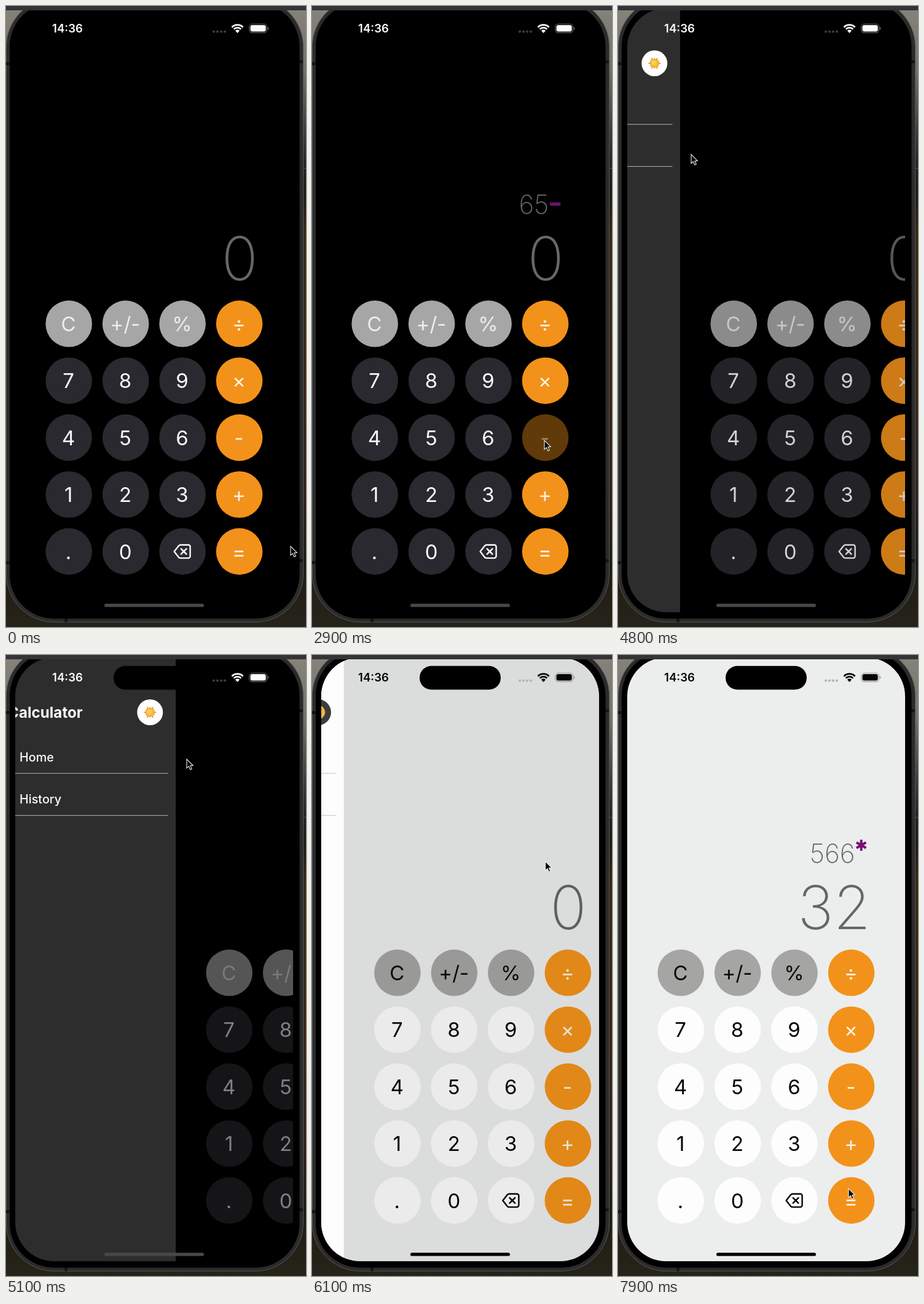
An HTML page with a canvas for the animation above (8000 ms loop, 488x1008 px).

```html
<!DOCTYPE html>
<html lang="en">
<head>
<meta charset="utf-8">
<title>Calculator</title>
<style>
html, body { margin: 0; width: 100%; height: 100%; overflow: hidden; background: #000; }
canvas { display: block; width: 488px; height: 1008px; }
</style>
</head>
<body>
<canvas id="stage" width="488" height="1008"></canvas>
<script>
const ctx = document.getElementById('stage').getContext('2d');
const LOOP = 8000, STEP = 100;
const FONT = 'Inter, Roboto, "Liberation Sans", sans-serif';
const MENU_W = 294, SCREEN = { x: 15, y: 4, w: 452, h: 980, r: 63 };

const DARK = { bg: '#000', menu: '#2d2d2d', ink: '#fbfbfb', key: '#29292f', gray: '#a6a6a6',
  grayInk: '#ededed', digits: '#686868', op: '#6c1269', line: '#b4b4b4', dots: '#3b3b3b', bar: '#484848' };
const LIGHT = { bg: '#eceeed', menu: '#fdfdfd', ink: '#050505', key: '#fdfdfd', gray: '#a5a5a4',
  grayInk: '#0a0a0a', digits: '#666', op: '#780f70', line: '#c6c6c6', dots: '#b4b6b5', bar: '#000' };

const ROWS = ['C ± % ÷', '7 8 9 ×', '4 5 6 -', '1 2 3 +', '. 0 < ='].map(r => r.split(' '));

// key presses: time, key
const PRESSES = [[800, '1'], [1000, '2'], [1200, '+'], [1400, '9'], [1500, '9'], [1800, '='],
  [2100, 'C'], [2400, '6'], [2600, '5'], [2900, '-'], [3200, '2'], [3500, '0'], [4000, '='],
  [4300, 'C'], [6800, '5'], [7000, '6'], [7100, '6'], [7300, '×'], [7500, '3'], [7700, '2']];

// pointer path: time, x, y
const PATH = [[0, 463, 877], [200, 452, 872], [700, 104, 800], [900, 96, 801], [1000, 190, 797],
  [1200, 376, 798], [1400, 286, 612], [1500, 287, 613], [1700, 408, 874], [1800, 402, 880],
  [2100, 105, 520], [2400, 285, 704], [2600, 196, 704], [2900, 378, 705], [3200, 192, 797],
  [3500, 194, 888], [3600, 200, 889], [3900, 369, 891], [4000, 369, 891], [4300, 100, 520],
  [4600, 24, 280], [5100, 294, 169], [5200, 299, 166], [5500, 273, 99], [5700, 273, 99],
  [5900, 385, 320], [6050, 383, 330], [6700, 184, 632], [6800, 189, 692], [7000, 284, 703],
  [7100, 284, 704], [7300, 377, 612], [7500, 287, 797], [7700, 197, 797], [7900, 375, 866]];

const THEME_AT = 5600, RELEASE_AT = 5200, CLOSE_AT = 5900;

const clamp = (v, a, b) => Math.min(b, Math.max(a, v));
const easeInOut = p => p * p * (3 - 2 * p);
const easeOut = p => 1 - (1 - p) ** 3;

function pointer(t) {
  const i = PATH.findIndex(k => k[0] >= t);
  if (i === 0) return PATH[0].slice(1);
  if (i < 0) return PATH[PATH.length - 1].slice(1);
  const [t0, x0, y0] = PATH[i - 1], [t1, x1, y1] = PATH[i];
  const p = easeInOut((t - t0) / (t1 - t0));
  return [x0 + (x1 - x0) * p, y0 + (y1 - y0) * p];
}

// the drawer follows the drag, then settles
function drawer(t) {
  if (t < 4600) return 0;
  const drag = s => clamp(pointer(s)[0] - 33, 0, MENU_W);
  if (t <= RELEASE_AT) return drag(t);
  const from = drag(RELEASE_AT);
  if (t < CLOSE_AT) return from + (MENU_W - from) * easeOut(clamp((t - RELEASE_AT) / 200, 0, 1));
  return MENU_W * (1 - easeOut(clamp((t - CLOSE_AT) / 400, 0, 1)));
}

function calculator(t) {
  let first = '', second = '', op = '';
  for (const [at, key] of PRESSES) {
    if (at > t) break;
    if (key === 'C') first = second = op = '';
    else if (key === '=') {
      const a = +second, b = +first;
      first = String(op === '+' ? a + b : op === '-' ? a - b : a * b);
      second = op = '';
    } else if ('+-×'.includes(key)) {
      second = first; first = ''; op = key;
    } else first += key;
  }
  return { first: first || '0', second, op };
}

function pressAlpha(key, t) {
  for (const [at, k] of PRESSES) {
    if (k === key && t >= at && t < at + 200) return 0.4 + 0.6 * (t - at) / 200;
  }
  return 1;
}

function text(str, x, y, size, weight, color, align = 'center') {
  ctx.font = `${weight} ${size}px ${FONT}`;
  ctx.textAlign = align;
  ctx.fillStyle = color;
  ctx.fillText(str, x, y);
}

// puts the right edge of the ink at x
function inkRight(str, x, y, size, color) {
  ctx.font = `200 ${size}px ${FONT}`;
  ctx.textAlign = 'left';
  ctx.fillStyle = color;
  ctx.fillText(str, x - ctx.measureText(str).actualBoundingBoxRight, y);
}

function round(x, y, w, h, r, fill) {
  ctx.beginPath();
  ctx.roundRect(x, y, w, h, r);
  if (fill) { ctx.fillStyle = fill; ctx.fill(); }
}

function disc(x, y, r, fill) {
  ctx.beginPath();
  ctx.arc(x, y, r, 0, 7);
  ctx.fillStyle = fill;
  ctx.fill();
}

function rect(x, y, w, h, fill) {
  ctx.fillStyle = fill;
  ctx.fillRect(x, y, w, h);
}

function lines(color, width, ...paths) {
  ctx.strokeStyle = color;
  ctx.lineWidth = width;
  ctx.beginPath();
  for (const p of paths) p.forEach(([x, y], i) => i ? ctx.lineTo(x, y) : ctx.moveTo(x, y));
  ctx.stroke();
}

function backdrop() {
  const g = ctx.createLinearGradient(0, 0, 0, 1008);
  [[0, '#86837a'], [.1, '#75726b'], [.2, '#403e3c'], [.26, '#242322'], [.3, '#211c18'], [.37, '#39290f'],
    [.62, '#3c2412'], [.76, '#33231a'], [.9, '#201c12'], [1, '#26231a']].forEach(s => g.addColorStop(...s));
  rect(0, 0, 488, 1008, g);
  rect(484, 263, 4, 1, '#555');
}

function body() {
  round(.5, -12, 483, 1012, 78, '#2b2b2c');
  ctx.strokeStyle = '#565656';
  ctx.lineWidth = 1;
  ctx.stroke();
  for (const y of [91, 901]) {
    rect(0, y, 6, 5, '#151515');
    rect(477, y - 3, 6, 5, '#151515');
  }
  rect(95, 994, 5, 6, '#151515');
  round(6, -6, 471.5, 1000.5, 72, '#000');
}

function operator(op, color) {
  const [len, cx, cy, angles] = {
    '+': [27, 390.7, 321, [0, 90]],
    '-': [17, 395.7, 321.5, [0]],
    '×': [18, 395.7, 308.8, [30, 90, 150]]
  }[op];
  const bars = angles.map(a => {
    const dx = Math.cos(a * Math.PI / 180) * len / 2, dy = Math.sin(a * Math.PI / 180) * len / 2;
    return [[cx - dx, cy - dy], [cx + dx, cy + dy]];
  });
  lines(color, op === '×' ? 4 : 5.5, ...bars);
  return cx - len / 2;
}

function eraseIcon(x, y, color) {
  ctx.lineJoin = ctx.lineCap = 'round';
  ctx.beginPath();
  ctx.moveTo(x - 13, y);
  ctx.lineTo(x - 5.5, y - 9.5);
  ctx.quadraticCurveTo(x - 4.5, y - 10.7, x - 2.5, y - 10.7);
  ctx.arcTo(x + 13, y - 10.7, x + 13, y, 3);
  ctx.arcTo(x + 13, y + 10.7, x, y + 10.7, 3);
  ctx.lineTo(x - 2.5, y + 10.7);
  ctx.quadraticCurveTo(x - 4.5, y + 10.7, x - 5.5, y + 9.5);
  ctx.closePath();
  ctx.strokeStyle = color;
  ctx.lineWidth = 2.4;
  ctx.stroke();
  const cx = x + 2.5, d = 4.3;
  lines(color, 2.6, [[cx - d, y - d], [cx + d, y + d]], [[cx - d, y + d], [cx + d, y - d]]);
  ctx.lineJoin = 'miter';
  ctx.lineCap = 'butt';
}

function keypad(t, c) {
  ROWS.forEach((row, j) => row.forEach((key, i) => {
    const x = 102.2 + i * 92.45, y = 515.8 + j * 92.4;
    const orange = i === 3, gray = !orange && j === 0;
    const ink = orange ? '#faf3ea' : gray ? c.grayInk : c.ink;
    ctx.globalAlpha = pressAlpha(key, t);
    disc(x, y, 37.8, orange ? '#f3921a' : gray ? c.gray : c.key);
    if (key === '<') eraseIcon(x - .5, y, ink);
    else text(key === '±' ? '+/-' : key, x - .6, y + 12.2, 33, 400, ink);
    ctx.globalAlpha = 1;
  }));
}

function display(t, c) {
  const { first, second, op } = calculator(t);
  if (op) inkRight(second, operator(op, c.op) - 4, 337, 42.5, c.digits);
  inkRight(first, 403.5, 445, 98, c.digits);
}

function sun(x, y) {
  ctx.beginPath();
  for (let i = 0; i < 24; i++) {
    const a = i * Math.PI / 12, r = i % 2 ? 6.5 : i % 4 ? 9 : 11;
    ctx.lineTo(x + Math.cos(a) * r, y + Math.sin(a) * r);
  }
  ctx.closePath();
  ctx.fillStyle = '#e58f22';
  ctx.fill();
  disc(x, y, 6.6, '#f6bb3c');
  disc(x - 1, y - 1, 3.8, '#fbcf58');
}

function moon(x, y) {
  ctx.beginPath();
  ctx.arc(x, y, 11.3, -1.15, 2.75);
  ctx.quadraticCurveTo(x + 8, y + 5, x + 4.6, y - 10.3);
  ctx.closePath();
  ctx.fillStyle = '#efb544';
  ctx.fill();
}

function menu(shift, c) {
  ctx.save();
  ctx.translate(shift - MENU_W, 0);
  rect(15, 0, MENU_W, 990, c.menu);
  text('Calculator', 36, 102, 24.2, 700, c.ink, 'left');
  disc(267.3, 93, 21, c === DARK ? '#fff' : '#3c3c3d');
  (c === DARK ? sun : moon)(267.3, 93);
  ['Home', 'History'].forEach((label, i) => {
    text(label, 55, 173 + i * 68, 19.8, 500, c.ink, 'left');
    rect(28, 191.6 + i * 68.3, 268.5, 1, c.line);
  });
  ctx.restore();
}

function status(c, covered) {
  const ink = covered ? '#fff' : c.ink;
  text('14:36', 100, 43.4, 18.6, 600, c.ink);
  for (let i = 0; i < 4; i++) disc(338 + i * 6, 41.6, 2.1, covered && c === LIGHT ? '#929292' : c.dots);

  const a = Math.PI * .75, wx = 376.5, wy = 43.5;
  ctx.strokeStyle = ink;
  ctx.lineWidth = 2.7;
  for (const r of [12.8, 8.3]) {
    ctx.beginPath();
    ctx.arc(wx, wy, r, -a, a - Math.PI);
    ctx.stroke();
  }
  ctx.beginPath();
  ctx.moveTo(wx, wy + .5);
  ctx.arc(wx, wy, 5, -a, a - Math.PI);
  ctx.fillStyle = ink;
  ctx.fill();

  round(395.7, 29.2, 28.8, 14.2, 4.6);
  ctx.strokeStyle = covered && c === LIGHT ? '#a8a8a8' : c === LIGHT ? '#9a9b9a' : '#666';
  ctx.lineWidth = 1.1;
  ctx.stroke();
  round(397.5, 31, 25.2, 10.6, 3, ink);
  round(425.8, 34, 1.6, 4.8, [0, 2, 2, 0], ctx.strokeStyle);
}

function arrow(x, y) {
  ctx.beginPath();
  [[0, 0], [0, 14.6], [3.3, 11.6], [5.7, 17], [8.2, 15.9], [5.9, 10.7], [10.2, 10.4]]
    .forEach(([dx, dy]) => ctx.lineTo(x + dx, y + dy));
  ctx.closePath();
  ctx.fillStyle = '#000';
  ctx.fill();
  ctx.strokeStyle = '#f2f2f2';
  ctx.lineWidth = 1.1;
  ctx.stroke();
}

function draw(t) {
  const shift = drawer(t), open = shift / MENU_W;
  const c = t < THEME_AT ? DARK : LIGHT;
  backdrop();
  body();

  ctx.save();
  round(SCREEN.x, SCREEN.y, SCREEN.w, SCREEN.h, SCREEN.r);
  ctx.clip();
  rect(0, 0, 488, 1008, c.bg);
  ctx.save();
  ctx.translate(shift, 0);
  display(t, c);
  keypad(t, c);
  ctx.restore();
  if (open > 0) {
    rect(15 + shift, 0, 488, 1008, `rgba(0,0,0,${.55 * open})`);
    menu(shift, c);
  }
  ctx.restore();

  round(175, 17.7, 132, 38.6, 19.3, '#000');
  status(c, open > .5);
  round(160, 970.2, 162, 5.4, 2.7, c.bar);
  rect(0, 0, 488, 7, '#343437');
  arrow(...pointer(t));
}

function tick(now) {
  draw(Math.floor(now % LOOP / STEP) * STEP);
  requestAnimationFrame(tick);
}
draw(0);
requestAnimationFrame(tick);
</script>
</body>
</html>
```
